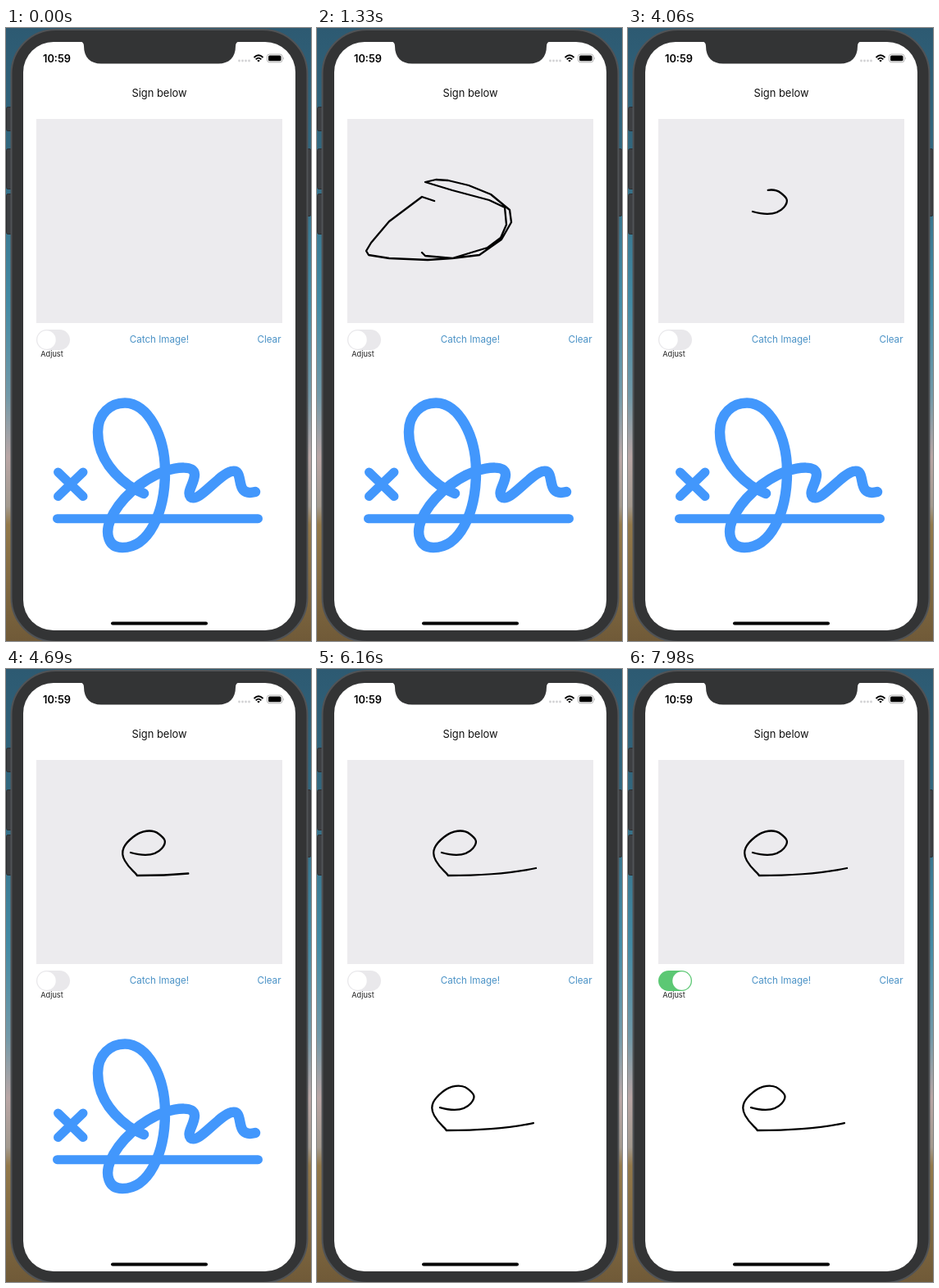
These frames come from a looping animation (372x748 px, 8000 ms). An HTML page:

```html
<!DOCTYPE html>
<html lang="en">
<head>
<meta charset="utf-8">
<title>Signing pad</title>
<style>
  html, body { margin: 0; width: 100%; height: 100%; overflow: hidden; }
  svg { display: block; width: 100vw; height: 100vh; }
  text { font-family: Inter, Roboto, sans-serif; }
  .link { font-size: 11.6px; fill: #4a92c6; }
  .ink { fill: none; stroke: #000; stroke-width: 2.3; stroke-linecap: round; stroke-linejoin: round; }
  .icon { fill: none; stroke: #4297fc; stroke-linecap: round; stroke-linejoin: round; }
</style>
</head>
<body>
<svg viewBox="0 0 372 748">
  <defs>
    <linearGradient id="sky" x2="0" y2="1">
      <stop offset="0" stop-color="#2d5a72"/>
      <stop offset=".2" stop-color="#32687f"/>
      <stop offset=".45" stop-color="#438ba5"/>
      <stop offset=".6" stop-color="#7299a8"/>
      <stop offset=".7" stop-color="#b9a6a5"/>
      <stop offset=".78" stop-color="#a39a8f"/>
      <stop offset=".81" stop-color="#93794a"/>
      <stop offset="1" stop-color="#705a38"/>
    </linearGradient>
    <path id="loop" d="M152 224C170 229 183 227 190 219S194 207 186 201S165 197 155 205S138 222 145 234S156 246 160 252C195 252 235 250 267 243"/>
  </defs>

  <rect width="372" height="748" fill="url(#sky)"/>
  <g fill="#3d3f42" stroke="#2b2d30">
    <rect x=".5" y="96.5" width="9" height="29" rx="2"/>
    <rect x=".5" y="147.5" width="9" height="49" rx="2"/>
    <rect x=".5" y="202.5" width="9" height="49" rx="2"/>
    <rect x="364" y="147.5" width="8" height="82" rx="2"/>
  </g>
  <rect x="6.5" y="2" width="361" height="747" rx="54" fill="#333435" stroke="#505356" stroke-width="2"/>
  <rect x="21" y="17" width="332" height="718" rx="37" fill="#fff"/>
  <path d="M90 16Q95 17 95 22C95 36 103 43.500 116 43.500H259C272 43.500 280 36 280 22Q280 17 285 16Z" fill="#333435"/>

  <text x="45" y="41.500" font-size="12.8" font-weight="600">10:59</text>
  <g fill="#d2d2d4">
    <circle cx="284.500" cy="40" r="1.400"/><circle cx="288.500" cy="40" r="1.400"/>
    <circle cx="292.500" cy="40" r="1.400"/><circle cx="296.500" cy="40" r="1.400"/>
  </g>
  <g fill="none" stroke="#000" stroke-width="1.900">
    <path d="M302.500 36Q308 30.500 313.500 36M304.700 38.300Q308 35 311.300 38.300"/>
    <path d="M306.200 39.700Q308 38.300 309.800 39.700L308 41.500Z" fill="#000" stroke="none"/>
  </g>
  <rect x="318.500" y="32" width="18.500" height="9.800" rx="2.800" fill="none" stroke="#aaa" stroke-width=".9"/>
  <rect x="320" y="33.500" width="15.500" height="6.800" rx="1.500"/>
  <path d="M338.300 35.300Q340 37 338.300 38.700Z" fill="#aaa"/>

  <text x="187" y="84" font-size="12.9" text-anchor="middle" fill="#111">Sign below</text>
  <rect x="37" y="111" width="300" height="249" fill="#ecebee"/>
  <path id="doodle" class="ink" d="M128 274L132 278L165 281L198 277L225 258L237 237L235 222L212 203L185 192L160 186L145 185L132 188L165 198L210 210L229 219L231 240L224 256L208 268L165 281L135 283L88 281L63 277L60 272L66 262L88 236L128 206L143 211L180 223L186 268L193 277L202 280L215 281"/>
  <use id="second" href="#loop" class="ink"/>

  <rect id="track" x="37" y="368" width="41" height="25" rx="12.500"/>
  <circle id="knob" cy="380.500" r="11.200" fill="#fff"/>
  <text x="56" y="400.500" font-size="9.2" text-anchor="middle" fill="#222">Adjust</text>
  <text id="grab" class="link" x="187" y="384.300" text-anchor="middle">Catch Image!</text>
  <text id="clear" class="link" x="335.500" y="384.300" text-anchor="end">Clear</text>

  <g id="icon" class="icon">
    <path stroke-width="11" d="M63.500 542L94 571.500M94 542L63.500 571.500M62.500 598.700H307.500"/>
    <path stroke-width="12.500" d="M168 568C148 560 112 534 112 493C112 470 128 457.500 145 457.500C173 457.500 194 498 194 541C194 592 174 634 142 634C124 634 121 616 127 601C137 576 165 551 193 541C208 536 230 533 230 545C230 555 220 566 225 572C235 580 259 545 275 541C293 537 276 573 304 566"/>
  </g>
  <use id="copy" href="#loop" class="ink" transform="translate(-.5 311.500) scale(.99 .998)"/>
  <rect x="128" y="724.500" width="118" height="4" rx="2"/>
</svg>
<script>
const LOOP = 8000, STEP = 70;
const CLEARED = 3010, CAUGHT = 5740, SWITCHED = 7350;
const $ = id => document.getElementById(id);
const clamp = v => Math.min(1, Math.max(0, v));
const ramp = (t, a, b) => clamp((t - a) / (b - a));
const ease = p => p * p * (3 - 2 * p);
const show = (el, on) => el.setAttribute("visibility", on ? "visible" : "hidden");

const doodle = $("doodle"), second = $("second");
const lengths = new Map([[doodle, doodle.getTotalLength()], [second, $("loop").getTotalLength()]]);

function trace(el, p, on = true) {
  const len = lengths.get(el);
  show(el, on && p > 0);
  el.style.strokeDasharray = `${len * p} ${len + 10}`;
}

// Dims at once on touch, fades back after release.
const press = (t, down, up) => t < down ? 1 : t < up ? .2 : .2 + .8 * ease(ramp(t, up, up + 350));

const mix = (a, b, p) => `rgb(${a.map((v, i) => Math.round(v + (b[i] - v) * p))})`;

function draw(time) {
  const t = Math.floor(time % LOOP / STEP) * STEP;
  trace(doodle, .8525 * ramp(t, 490, 1330) + .1475 * ramp(t, 1330, 1610), t < CLEARED);
  trace(second, .3 * ramp(t, 3780, 4060) + .7 * ramp(t, 4060, 4900));

  $("clear").style.opacity = press(t, 2870, CLEARED);
  $("grab").style.opacity = press(t, 5530, CAUGHT);
  show($("icon"), t < CAUGHT);
  show($("copy"), t >= CAUGHT);

  const on = ease(ramp(t, SWITCHED, SWITCHED + 280));
  $("track").setAttribute("fill", mix([233, 232, 235], [92, 200, 116], on));
  $("knob").setAttribute("cx", 49.5 + 16 * on);
}

const start = performance.now();
function tick() {
  draw(performance.now() - start);
  requestAnimationFrame(tick);
}
tick();
</script>
</body>
</html>
```
